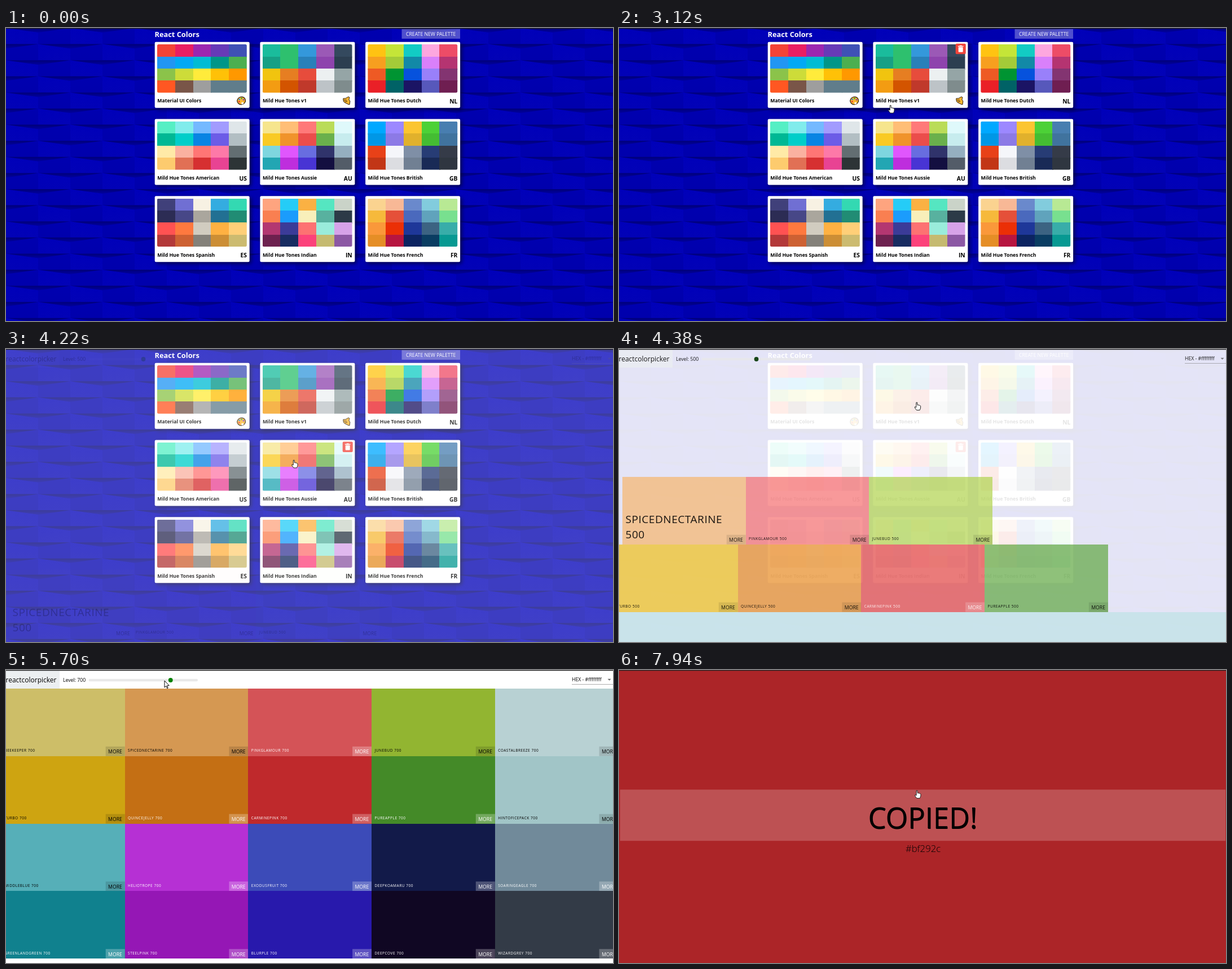
An HTML page with a canvas for the animation above (8 s loop, 1076 by 520 pixels).

```html
<!DOCTYPE html>
<html lang="en">
<head>
<meta charset="utf-8">
<title>React Colors</title>
<style>
html, body { margin: 0; width: 100%; height: 100%; overflow: hidden; background: #0000b0; }
canvas { display: block; }
</style>
</head>
<body>
<canvas id="stage" width="1076" height="520"></canvas>
<script>
const W = 1076, H = 520, LOOP = 8000;
const FONT = '"Open Sans", "Noto Sans", sans-serif';
const ctx = document.getElementById('stage').getContext('2d');

const SETS = [
  ['Material UI Colors', '', 'f44336 e91e63 9c27b0 673ab7 3f51b5 2196f3 03a9f4 00bcd4 009688 4caf50 8bc34a cddc39 ffeb3b ffc107 ff9800 ff5722 795548 9e9e9e 607d8b 607d8b'],
  ['Mild Hue Tones v1', '', '1abc9c 2ec06e 3498db 9b59b6 34495e 16a085 2ec06e 2980b9 8e44ad 2c3e50 f1c40f e67e22 e74c3c ecf0f1 95a5a6 f39c12 d35400 c0392b bdc3c7 7f8c8d'],
  ['Mild Hue Tones Dutch', 'NL', 'ffc312 c4e538 12cbc4 fda7df ed4c67 f79f1f a3cb38 1289a7 d980fa b53471 ee5a24 009432 0652dd 9980fa 833471 ea2027 006266 1b1464 5758bb 6f1e51'],
  ['Mild Hue Tones American', 'US', '55efc4 81ecec 74b9ff a29bfe dfe6e9 00b894 00cec9 0984e3 6c5ce7 b2bec3 ffeaa7 fab1a0 ff7675 fd79a8 636e72 fdcb6e e17055 d63031 e84393 2d3436'],
  ['Mild Hue Tones Aussie', 'AU', 'f6e58d ffbe76 ff7979 badc58 dff9fb f9ca24 f0932b eb4d4b 6ab04c c7ecee 7ed6df e056fd 686de0 30336b 95afc0 22a6b3 be2edd 4834d4 130f40 535c68'],
  ['Mild Hue Tones British', 'GB', '00a8ff 9c88ff fbc531 4cd137 487eb0 0097e6 8c7ae6 e1b12c 44bd32 40739e e84118 f5f6fa 7f8fa6 273c75 353b48 c23616 dcdde1 718093 192a56 2f3640'],
  ['Mild Hue Tones Spanish', 'ES', '40407a 706fd3 f7f1e3 34ace0 33d9b2 2c2c54 474787 aaa69d 227093 218c74 ff5252 ff793f d1ccc0 ffb142 ffcf78 b33939 cd6133 84817a cc8e35 ccbb70'],
  ['Mild Hue Tones Indian', 'IN', 'fea47f 25ccf7 fab143 55e6c1 cad3c8 f97f51 1b9cfc f8efba 58b19f 2c3a47 b33771 3b3b98 fd7272 9aecdb d6a2e8 6d214f 182c61 fc427b c5ba70 8c58a4'],
  ['Mild Hue Tones French', 'FR', 'fad390 f8b896 6a89cc 82ccdd b8e994 f6b93b e55039 4a69bd 60a3bc 78e08f fa983a eb2f06 1e3799 3c6382 38ada9 e58e26 b71540 0c2461 0a3d62 079992']
];
const NAMES = ('BEEKEEPER SPICEDNECTARINE PINKGLAMOUR JUNEBUD COASTALBREEZE TURBO QUINCEJELLY CARMINEPINK ' +
  'PUREAPPLE HINTOFICEPACK MIDDLEBLUE HELIOTROPE EXODUSFRUIT DEEPKOAMARU SOARINGEAGLE GREENLANDGREEN ' +
  'STEELPINK BLURPLE DEEPCOVE WIZARDGREY').split(' ');
const CARMINE = 7, SPICED = 1;

const clamp = v => Math.max(0, Math.min(1, v));
const span = (t, a, b) => clamp((t - a) / (b - a));
const mix = (a, b, k) => a + (b - a) * k;
const smooth = u => u * u * (3 - 2 * u);

// --- colour levels: dark -> base in Lab space
const lin = c => c <= 0.04045 ? c / 12.92 : ((c + 0.055) / 1.055) ** 2.4;
const gam = c => c <= 0.0031308 ? 12.92 * c : 1.055 * c ** (1 / 2.4) - 0.055;
const labF = v => v > 0.008856 ? Math.cbrt(v) : 7.787 * v + 4 / 29;
const labInv = v => v > 6 / 29 ? v ** 3 : (v - 4 / 29) / 7.787;

function toLab(rgb) {
  const [r, g, b] = rgb.map(lin);
  const x = labF((0.4124 * r + 0.3576 * g + 0.1805 * b) / 0.95047);
  const y = labF(0.2126 * r + 0.7152 * g + 0.0722 * b);
  const z = labF((0.0193 * r + 0.1192 * g + 0.9505 * b) / 1.08883);
  return [116 * y - 16, 500 * (x - y), 200 * (y - z)];
}
function toRgb([l, a, b]) {
  const fy = (l + 16) / 116;
  const x = labInv(fy + a / 500) * 0.95047, y = labInv(fy), z = labInv(fy - b / 200) * 1.08883;
  return [3.2406 * x - 1.5372 * y - 0.4986 * z, -0.9689 * x + 1.8758 * y + 0.0415 * z,
    0.0557 * x - 0.204 * y + 1.057 * z].map(v => clamp(gam(Math.max(0, v))));
}
function shade(hex, level) {
  const base = toLab([0, 2, 4].map(i => parseInt(hex.slice(i, i + 2), 16) / 255));
  const dark = toLab(toRgb([base[0] - 25.2, base[1], base[2]]));
  const k = (900 - level) / 450;
  const rgb = toRgb(base.map((v, i) => mix(dark[i], v, k)));
  const [r, g, b] = rgb.map(lin);
  return {
    css: `rgb(${rgb.map(v => Math.round(v * 255))})`,
    light: 0.2126 * r + 0.7152 * g + 0.0722 * b > 0.27
  };
}
const LEVELS = {};
for (const level of [500, 600, 700]) {
  LEVELS[level] = SETS[4][2].split(' ').map(hex => shade(hex, level));
}

// --- drawing helpers
function text(c, str, x, y, size, color, { weight = 400, align = 'left', gap = 0 } = {}) {
  c.font = `${weight} ${size}px ${FONT}`;
  c.textAlign = align;
  c.letterSpacing = gap + 'px';
  c.fillStyle = color;
  c.fillText(str, x, y);
}
function rect(c, x, y, w, h, color) {
  c.fillStyle = color;
  c.fillRect(x, y, w, h);
}
function round(c, x, y, w, h, r, color) {
  c.beginPath();
  c.roundRect(x, y, w, h, r);
  c.fillStyle = color;
  c.fill();
}
function poly(c, pts, fill, stroke) {
  c.beginPath();
  for (let i = 0; i < pts.length; i += 2) c.lineTo(pts[i], pts[i + 1]);
  c.closePath();
  c.fillStyle = fill;
  c.fill();
  if (stroke) { c.strokeStyle = stroke; c.lineWidth = 1; c.lineJoin = 'round'; c.stroke(); }
}
function dot(c, x, y, r, color) {
  c.beginPath();
  c.arc(x, y, r, 0, 7);
  c.fillStyle = color;
  c.fill();
}
function fade(c, y0, y1, from, to) {
  const g = c.createLinearGradient(0, y0, 0, y1);
  g.addColorStop(0, from);
  g.addColorStop(1, to);
  return g;
}

// --- palette list page
const cardAt = i => [263.7 + (i % 3) * 186.7, 24.8 + Math.floor(i / 3) * 136.7];

// staggered two-faced blocks, each row casting a wedge of shadow on the next
function drawBlocks(c) {
  const bw = 114, rh = 28.6, d = 8;
  for (let row = 0; row < 19; row++) {
    const y = row * rh;
    for (let x = (row & 1) * bw / 2 - bw; x < W; x += bw) {
      const m = x + bw / 2;
      rect(c, x, y, bw / 2 + 1, rh + 1, fade(c, y, y + rh, '#0000ba', '#0202b6'));
      rect(c, m, y, bw / 2 + 1, rh + 1, fade(c, y, y + rh, '#0000b0', '#0000ac'));
      poly(c, [x, y, x + bw, y, m, y + d], fade(c, y, y + d, '#000078', '#0000a0'));
    }
  }
}
function drawPaintIcon(c, x, y) {
  c.beginPath();
  c.ellipse(x, y, 7.4, 6.8, -0.3, 0, 7);
  c.fillStyle = '#fdb62f';
  c.fill();
  c.strokeStyle = '#2a1c0c';
  c.lineWidth = 1.2;
  c.stroke();
  dot(c, x + 2, y + 4.4, 2, '#fff');
  ['#e33', '#2a8be0', '#3aa545', '#8a3fb0'].forEach((col, i) => {
    dot(c, x + 4.3 * Math.cos(2.7 + i * 1.05), y + 4 * Math.sin(2.7 + i * 1.05), 1.4, col);
  });
}
function drawHandIcon(c, x, y) {
  poly(c, [x - 6, y - 4, x - 2, y - 4, x + 3, y - 7, x + 5, y - 6, x + 4, y - 2, x + 6, y + 1,
    x + 5, y + 7, x + 2, y + 6, x - 2, y + 4, x - 5, y + 2, x - 6, y - 1], '#fdb62f', '#2a1c0c');
  c.beginPath();
  c.moveTo(x - 5, y - 1); c.lineTo(x, y - 1);
  c.moveTo(x - 3, y + 2); c.lineTo(x + 1, y + 1);
  c.stroke();
}
function drawCard(c, [name, code, colors], i) {
  const [x, y] = cardAt(i);
  c.save();
  c.shadowColor = 'rgba(0,0,40,.75)';
  c.shadowBlur = 7;
  c.shadowOffsetX = 3;
  c.shadowOffsetY = 3;
  round(c, x, y, 168, 117, 2.2, '#fff');
  c.restore();
  c.save();
  c.beginPath();
  c.roundRect(x + 4.3, y + 4.3, 158.8, 85.6, 2.5);
  c.clip();
  colors.split(' ').forEach((hex, k) => {
    const l = Math.round(x + 4.3 + (k % 5) * 31.75), t = Math.round(y + 4.3 + Math.floor(k / 5) * 21.4);
    rect(c, l, t, 33, 23, '#' + hex);
  });
  c.restore();
  text(c, name, x + 4.5, y + 107.3, 8.7, '#000', { weight: 700 });
  if (code) text(c, code, x + 163.3, y + 109.2, 10.3, '#000', { weight: 700, align: 'right' });
  else (i ? drawHandIcon : drawPaintIcon)(c, x + 153.5, y + 104.2);
}
const listPage = document.createElement('canvas');
listPage.width = W;
listPage.height = H;
{
  const c = listPage.getContext('2d');
  drawBlocks(c);
  text(c, 'React Colors', 263.5, 15.8, 12.8, '#fff', { weight: 700 });
  rect(c, 701.5, 2, 103.5, 17, 'rgba(255,255,255,.31)');
  text(c, 'CREATE NEW PALETTE', 753.2, 14.3, 8.7, '#fff', { align: 'center' });
  SETS.forEach((set, i) => drawCard(c, set, i));
}

// card index, shown from, hidden from
const BINS = [[5, 1030, 1700], [2, 1830, 2450], [1, 2820, 3290], [4, 3330, 9000]];

function drawBin(i, alpha) {
  if (alpha <= 0) return;
  const [cx, cy] = cardAt(i), x = cx + 146.3, y = cy + 3;
  ctx.globalAlpha = alpha;
  round(ctx, x, y, 18, 18.4, 2, '#f0443a');
  rect(ctx, x + 4.2, y + 4, 9.6, 1.5, '#fff');
  rect(ctx, x + 7, y + 3, 4, 1.4, '#fff');
  round(ctx, x + 5, y + 6.3, 8, 8.7, 1, '#fff');
  ctx.globalAlpha = 1;
}
function drawList(t) {
  ctx.drawImage(listPage, 0, 0);
  for (const [i, on, off] of BINS) drawBin(i, span(t, on, on + 220) - span(t, off, off + 200));
}

// --- palette page
const BOX_W = 218.7, BOX_H = 119.8, LEFT = -8, TOP = 33;

function boxAt(i) {
  return { x: LEFT + (i % 5) * BOX_W, y: TOP + Math.floor(i / 5) * BOX_H, w: BOX_W };
}
// boxes while the page is still arranging itself
function looseBoxAt(i) {
  if (i === 0 || i === 4 || i === 11) return null;
  const b = boxAt(i);
  if (i < 4) b.x = 6 + (i - 1) * BOX_W;
  if (i === 9) Object.assign(b, { x: LEFT, y: TOP + 2 * BOX_H, w: 5 * BOX_W });
  if (i > 9) b.y += BOX_H;
  return b;
}
function drawHeader(level, knob, alpha) {
  ctx.globalAlpha = alpha ** 3;
  rect(ctx, 0, 0, 95, TOP, '#eceff1');
  round(ctx, 146.5, 15.8, 193.5, 4.4, 2.2, '#e9e9e9');
  ctx.globalAlpha = alpha;
  text(ctx, 'reactcolorpicker', -0.5, 22.2, 12, '#000');
  text(ctx, `Level: ${level}`, 101, 21, 8.7, '#000');
  dot(ctx, 147 + 193 * (level - 100) / 800, 18, 3.9, knob);
  text(ctx, 'HEX - #ffffffff', 1003, 20, 8.7, '#000');
  rect(ctx, 1003, 25, 73, 0.7, '#888');
  poly(ctx, [1066.5, 15.8, 1072.5, 15.8, 1069.5, 18.8], '#666');
}
function drawBox(i, { x, y, w }, level, alpha, big) {
  const { css, light } = LEVELS[level][i], ink = light ? '#000' : '#fff';
  const l = Math.round(x), t = Math.round(y);
  ctx.globalAlpha = alpha ** 3;
  rect(ctx, l, t, Math.round(x + w) - l, Math.round(y + BOX_H) - t, css);
  rect(ctx, x + w - 34, y + BOX_H - 17, 34, 17, light ? 'rgba(0,0,0,.13)' : 'rgba(255,255,255,.25)');
  ctx.globalAlpha = alpha;
  text(ctx, 'MORE', x + w - 17.2, y + BOX_H - 4.6, 8.7, ink, { align: 'center' });
  if (big) {
    text(ctx, NAMES[i], x + 5.5, y + 82, 19, ink, { gap: 0.54 });
    text(ctx, level, x + 5.5, y + 109, 19, ink, { gap: 0.54 });
  } else {
    text(ctx, `${NAMES[i]} ${level}`, x + 5.4, y + BOX_H - 7.6, 6.5, ink, { gap: 0.54 });
  }
}
function drawPalette(t) {
  const alpha = span(t, 4050, 4400) ** 2;
  const loose = t < 4690;
  const level = t < 5470 ? 500 : t < 5610 ? 600 : 700;
  const slide = 3 * BOX_H * (1 - smooth(span(t, 4220, 4560)));
  ctx.globalAlpha = alpha;
  rect(ctx, 0, 0, W, H, '#fff');
  NAMES.forEach((_, i) => {
    const b = loose ? looseBoxAt(i) : boxAt(i);
    if (!b) return;
    b.y += slide;
    drawBox(i, b, level, alpha, loose && i === SPICED);
  });
  drawHeader(level, loose ? '#003300' : '#008000', alpha);
  ctx.globalAlpha = 1;
}

// --- copied overlay
function drawCopied(t) {
  const b = boxAt(CARMINE), cx = b.x + BOX_W / 2, cy = b.y + BOX_H / 2;
  const s = 1 + 41.5 * smooth(span(t, 7277, 7877));
  const m = smooth(span(t, 7570, 7960));
  const tone = [191, 41, 44].map(v => Math.round(v * (1 - 0.1 * m)));
  rect(ctx, cx - BOX_W / 2 * s, cy - BOX_H / 2 * s, BOX_W * s, BOX_H * s, `rgb(${tone})`);
  if (!m) return;
  const k = mix(0.1, 1, m);
  ctx.save();
  ctx.globalAlpha = m;
  ctx.translate(538.5, 260);
  ctx.scale(k, k);
  rect(ctx, -W / 2 - 2, -48, W + 4, 91.5, 'rgba(255,255,255,.2)');
  text(ctx, 'COPIED!', 0, 21, 51, '#000', { align: 'center' });
  text(ctx, 'COPIED!', 0.6, 22, 51, '#000', { align: 'center' });
  text(ctx, '#bf292c', 0.5, 63.5, 16.8, '#000', { weight: 300, align: 'center' });
  ctx.restore();
}

// --- pointer: time, x, y of the tip
const PATH = [
  [350, 964, 488], [750, 850, 350], [1120, 712, 226], [1200, 712, 222], [1510, 708, 212], [1660, 708, 210],
  [2050, 698, 110], [2430, 676, 19], [2510, 670, 14], [2700, 590, 5], [2900, 505, 40], [3120, 481, 137],
  [3270, 498, 185], [3510, 506, 203], [3810, 506, 203], [3900, 510, 198], [4220, 510, 198], [4420, 532, 70],
  [4610, 549, 9], [5180, 549, 9], [5380, 244, 17], [5700, 281, 19], [6000, 281, 19], [6400, 440, 130],
  [6780, 530, 212], [6940, 527, 213], [7090, 531, 212], [7480, 531, 212], [7700, 528, 214], [8000, 528, 214]
];
function pointerAt(t) {
  const i = PATH.findIndex(p => p[0] > t);
  const [t0, x0, y0] = PATH[i - 1], [t1, x1, y1] = PATH[i];
  const u = span(t, t0, t1);
  return [mix(x0, x1, u), mix(y0, y1, u)];
}
function drawPointer(t) {
  if (t < 350) return;
  const [x, y] = pointerAt(t);
  const arrow = t < 1000 || (t > 5250 && y < TOP) || (t < 4050 && y < 24);
  ctx.save();
  ctx.translate(x, y);
  if (arrow) {
    poly(ctx, [0, 0, 0, 12, 2.8, 9.4, 4.6, 13.6, 6.2, 12.9, 4.5, 8.8, 8.2, 8.6], '#fff', '#000');
  } else {
    poly(ctx, [-0.8, 0, 1, 0, 1.3, 4.4, 3.4, 4.5, 5.4, 5.2, 7, 6.2, 6.8, 10, 5.4, 13.6, -0.2, 13.6,
      -3.4, 9.2, -3.2, 7.6, -0.9, 8.6], '#fff', '#222');
  }
  ctx.restore();
}

function draw(now) {
  const t = now % LOOP;
  if (t < 4400) drawList(t);
  if (t >= 4050) drawPalette(t);
  if (t >= 7240) drawCopied(t);
  rect(ctx, 0, 0, W, 1.3, '#222');
  drawPointer(t);
}
const start = performance.now();
function tick() {
  draw(performance.now() - start);
  requestAnimationFrame(tick);
}
tick();
</script>
</body>
</html>
```
